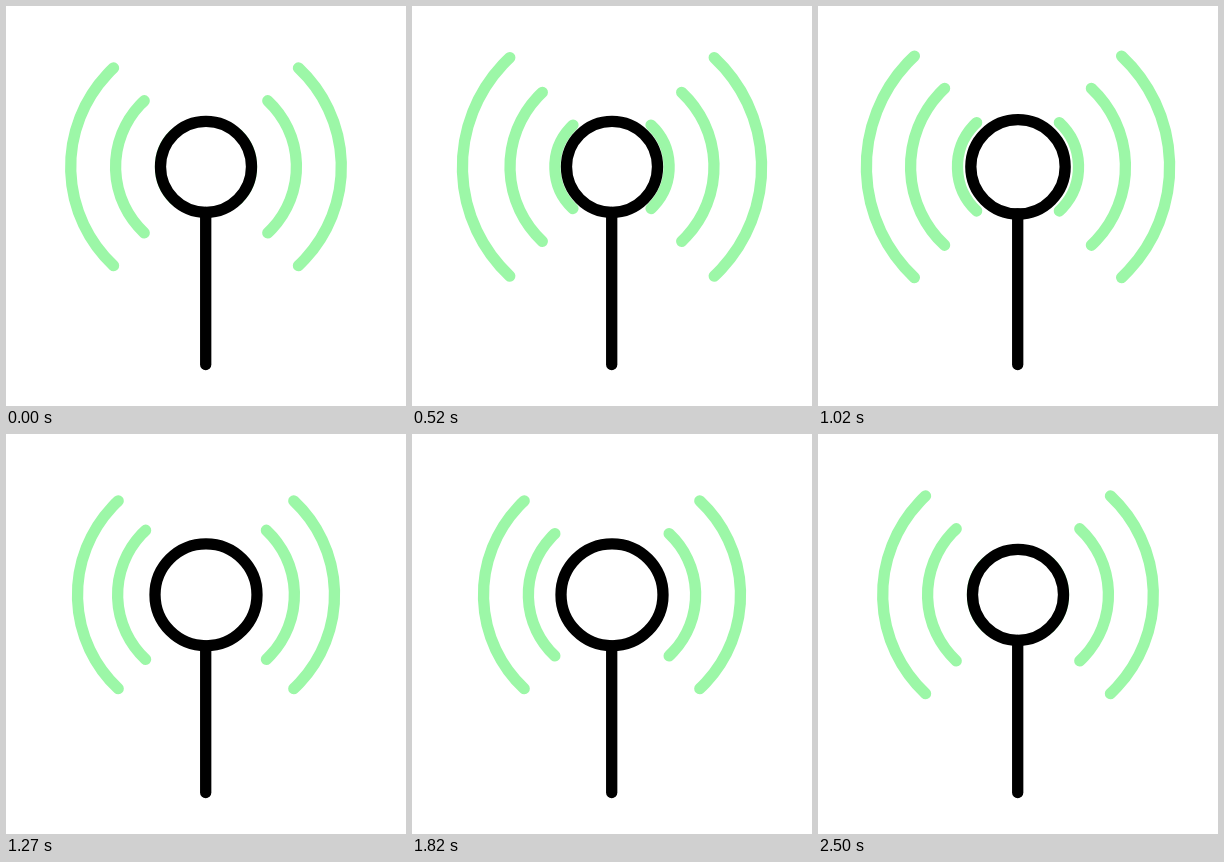
Write an HTML page with a canvas that moves like this. It is 400 px wide and 400 px high and loops after 2520 ms.

```html
<!DOCTYPE html>
<html lang="en">
<head>
<meta charset="utf-8">
<title>Antenna</title>
<style>
  html, body { margin: 0; width: 100%; height: 100%; overflow: hidden; background: #fff; }
  canvas { display: block; width: 100vmin; height: 100vmin; }
</style>
</head>
<body>
<canvas id="stage" width="400" height="400"></canvas>
<script>
const ctx = document.getElementById("stage").getContext("2d");
const LOOP = 2520;
const TICKS = 100;
const CENTER = { x: 200, y: 160.8 };
const SPREAD = 46.9 * Math.PI / 180;
const SPEED = 6.8;          // pixels per tick
const MAX_RADIUS = 164;
const HEAD_RADIUS = 45.5;
const HEAD_SWELL = 5.5;
const GREEN = "#9cf7a7";

// Tick at which each wave leaves the centre.
const EMISSIONS = [-1, 6, 12.6, 18.7, 25.2, 32.1, 38, 46, 54.1, 60.7, 67, 73.4, 80.1, 86.7, 93.3];

function smooth(from, to, value) {
  const p = Math.min(1, Math.max(0, (value - from) / (to - from)));
  return p * p * (3 - 2 * p);
}

// Ticks last 20 and 30 ms in turn.
function tickAt(time) {
  const t = time % LOOP;
  return 2 * Math.floor(t / 50) + (t % 50 >= 20 ? 1 : 0);
}

function waveRadii(tick) {
  return EMISSIONS
    .map(start => ((tick - start + 2 * TICKS) % TICKS) * SPEED)
    .filter(radius => radius < MAX_RADIUS);
}

function strokeArc(radius, from, to) {
  ctx.beginPath();
  ctx.arc(CENTER.x, CENTER.y, radius, from, to);
  ctx.stroke();
}

function draw(time) {
  const radii = waveRadii(tickAt(time) % TICKS);
  ctx.fillStyle = "#fff";
  ctx.fillRect(0, 0, 400, 400);
  ctx.lineWidth = 11.3;
  ctx.lineCap = "round";

  ctx.strokeStyle = GREEN;
  for (const radius of radii) {
    strokeArc(radius, -SPREAD, SPREAD);
    strokeArc(radius, Math.PI - SPREAD, Math.PI + SPREAD);
  }

  // The head swells just before a wave comes out of it.
  const swell = Math.max(0, ...radii.map(r => smooth(16, 28, r) * (1 - smooth(42, 45, r))));
  const head = HEAD_RADIUS + HEAD_SWELL * swell;
  ctx.strokeStyle = "#000";
  ctx.beginPath();
  ctx.arc(CENTER.x, CENTER.y, head, 0, 2 * Math.PI);
  ctx.fill();
  ctx.stroke();

  ctx.beginPath();
  ctx.moveTo(CENTER.x - 0.3, CENTER.y + head);
  ctx.lineTo(CENTER.x - 0.3, 358.6);
  ctx.stroke();
}

const begin = performance.now();
function frame() {
  draw(performance.now() - begin);
  requestAnimationFrame(frame);
}
frame();
</script>
</body>
</html>
```
